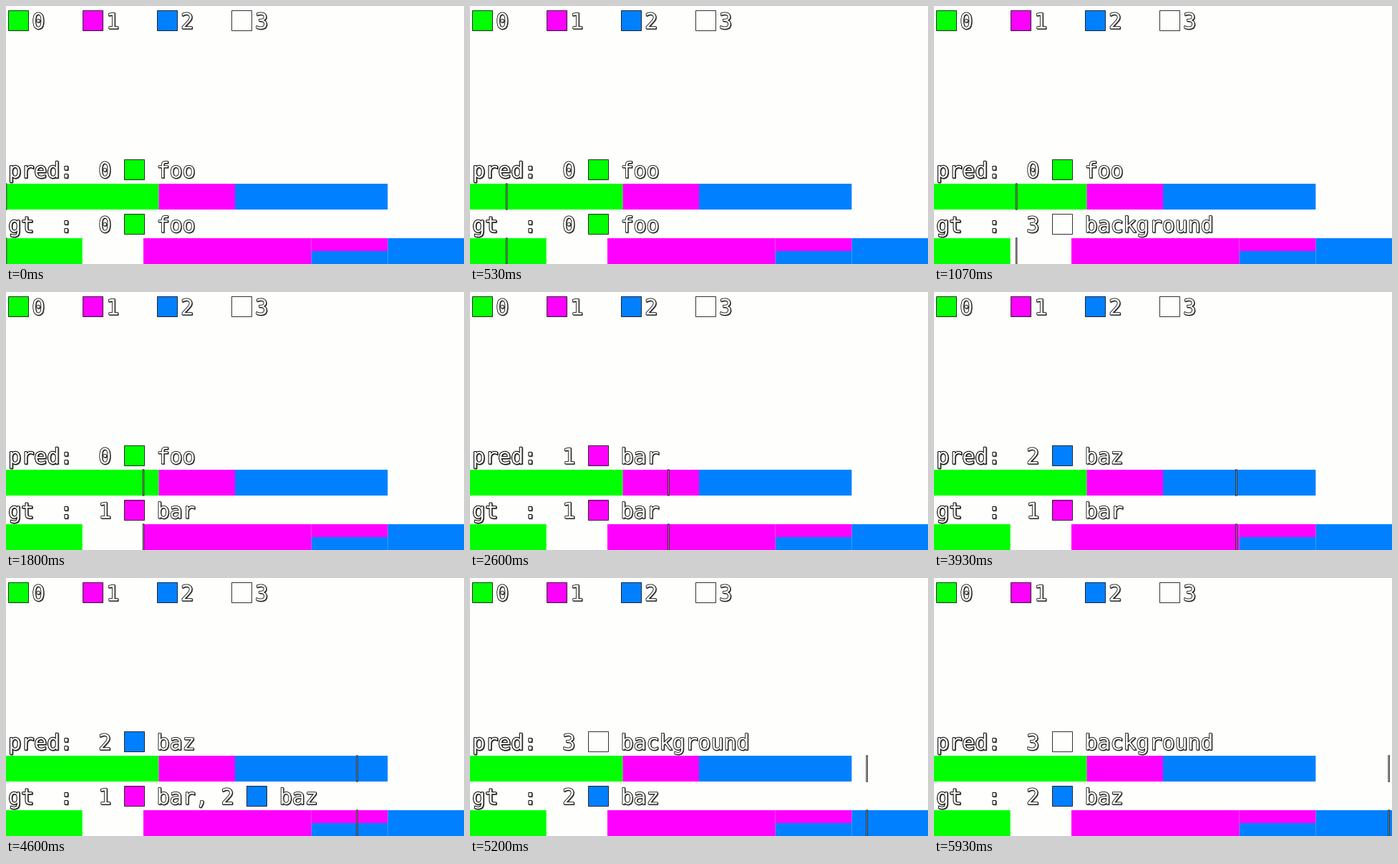
These frames come from a looping animation (640x360 px, 5990 ms). A matplotlib script:

```python
from math import floor

import matplotlib.pyplot as plt
from matplotlib.animation import FuncAnimation
from matplotlib.patches import PathPatch, Rectangle
from matplotlib.textpath import TextPath
from matplotlib.transforms import Affine2D

W, H, DPI = 640, 360, 100
FRAMES, LOOP_MS = 90, 5990
PX = 72 / DPI
UNIT = W / FRAMES

PAPER, INK = "#fefefc", "#000000"
COLORS = ["#00ff00", "#ff00ff", "#0080ff", PAPER]
NAMES = ["foo", "bar", "baz", "background"]
FONT = {"family": "DejaVu Sans Mono"}
SIZE = 29.9
ADVANCE = SIZE * 1233 / 2048
SIDE = 28
MARGIN = 3.2

# (start, end, classes), in ticks of the timeline
PRED = [(0, 30, [0]), (30, 45, [1]), (45, 75, [2]), (75, 90, [3])]
TRUTH = [(0, 15, [0]), (15, 27, [3]), (27, 60, [1]), (60, 75, [1, 2]), (75, 90, [2])]

fig = plt.figure(figsize=(W / DPI, H / DPI), dpi=DPI, facecolor=PAPER)
ax = fig.add_axes([0, 0, 1, 1])
ax.set_xlim(0, W)
ax.set_ylim(H, 0)
ax.axis("off")


def box(x, y, w, h, color, z=1, **kw):
    kw.setdefault("linewidth", 0)
    patch = Rectangle((x, y), w, h, facecolor=color, snap=False, zorder=z, **kw)
    return ax.add_patch(patch)


def swatch(x, mid, cls):
    return box(floor(x) + 0.5, mid - 14, SIDE, SIDE, COLORS[cls], 2,
               edgecolor=(0, 0, 0, 0.8), linewidth=PX)


def text(x, mid, s, border=0.8):
    """White text with a dark border and a slight drop shadow."""
    path = TextPath((0, 0), s, size=SIZE, prop=FONT)

    def layer(shift, z, **kw):
        place = Affine2D().scale(1, -1).translate(x + shift, mid + 11 + shift)
        return ax.add_patch(PathPatch(path, transform=place + ax.transData, zorder=z,
                                      joinstyle="round", **kw))

    stroke = dict(facecolor=INK, edgecolor=INK, linewidth=2 * border * PX)
    return [layer(0.8, 2, alpha=0.6, **stroke),
            layer(0, 3, **stroke),
            layer(0, 4, facecolor=PAPER, linewidth=0)]


def caption(mid, classes):
    """Class number, swatch and name for each active class."""
    x = MARGIN + 7 * ADVANCE
    parts = []
    for k, cls in enumerate(classes):
        name = NAMES[cls] + ("," if k < len(classes) - 1 else "")
        parts += text(x, mid, str(cls))
        x += 2 * ADVANCE
        parts.append(swatch(x, mid, cls))
        x += SIDE - 0.7 + ADVANCE
        parts += text(x, mid, name)
        x += (len(name) + 1) * ADVANCE
    return parts


class Track:
    def __init__(self, title, mid, top, spans):
        text(MARGIN, mid, title, border=1)
        self.captions = []
        for start, end, classes in reversed(spans):
            h = 36 / len(classes)
            for k, cls in enumerate(classes):
                if cls != 3:
                    box(start * UNIT, top + k * h, (end - start) * UNIT, h, COLORS[cls])
            self.captions.append((start, end, caption(mid, classes)))
        self.edge = box(0, top - 0.7, 2.6, 37.4, INK, 5, alpha=0.8)
        self.core = box(0, top + 0.3, 1, 35.4, "#a4a49c", 6)

    def seek(self, pos):
        for start, end, parts in self.captions:
            for part in parts:
                part.set_visible(start <= pos < end)
        for bar in (self.edge, self.core):
            bar.set_x(pos * UNIT - bar.get_width() / 2)


for cls in range(4):
    left = MARGIN + 104 * cls
    swatch(left, 20.5, cls)
    text(left + 33, 20.5, str(cls))

tracks = [Track("pred:", 228.5, 248, PRED), Track("gt  :", 304.5, 324, TRUTH)]


def update(i):
    # the cursor advances in uneven steps: 0, 0.4 and 0.8 of every third tick
    pos = 3 * (i // 3 + 0.4 * (i % 3))
    for track in tracks:
        track.seek(pos)
    return []


anim = FuncAnimation(fig, update, frames=FRAMES, interval=LOOP_MS / FRAMES,
                     init_func=lambda: update(0), repeat=True, repeat_delay=0)
plt.show()
```
